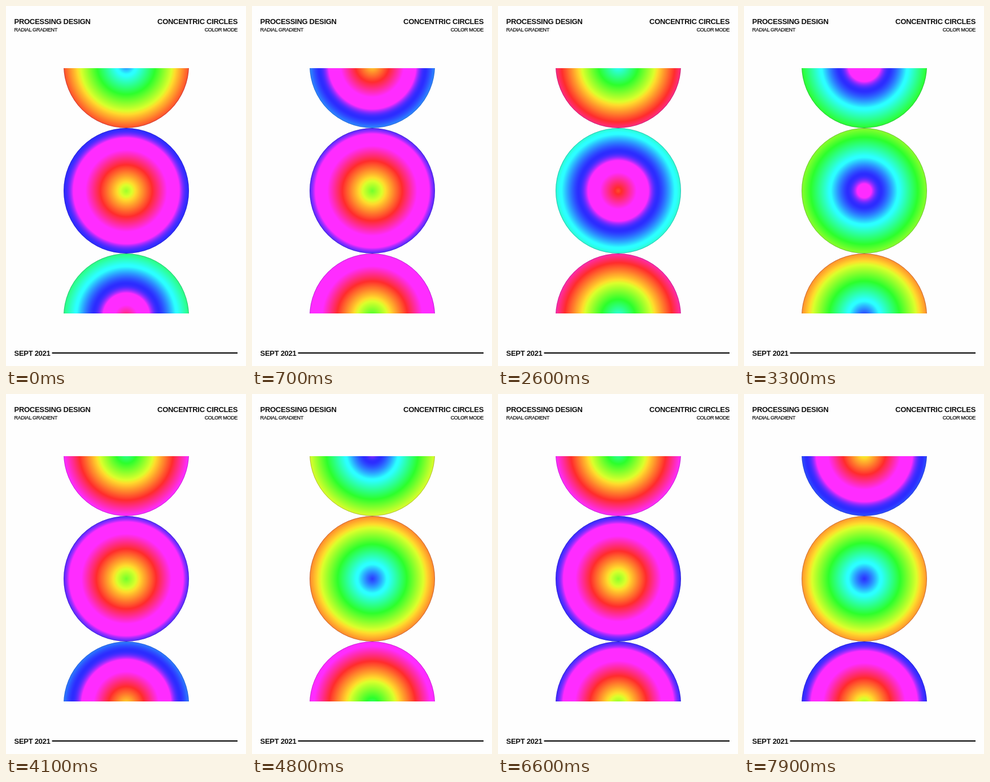
Recreate the animation shown at these times as an HTML page with a canvas. Size 425 px wide and 637 px high, loop 8 s.

```html
<!DOCTYPE html>
<html lang="en">
<head>
<meta charset="utf-8">
<title>Concentric Circles</title>
<style>
  html, body { margin: 0; width: 100%; height: 100%; overflow: hidden; background: #fefefe; }
  canvas, svg { position: absolute; left: 0; top: 0; width: 425px; height: 637px; display: block; }
  text { font-family: "Liberation Sans", Arial, sans-serif; fill: #111; }
  .bold { font-size: 13px; font-weight: 700; letter-spacing: -.3px; }
  .small { font-size: 9px; letter-spacing: -.32px; stroke: #111; stroke-width: .25px; }
  .end { text-anchor: end; }
</style>
</head>
<body>
<canvas></canvas>
<svg viewBox="0 0 425 637">
  <text class="bold" x="14.6" y="31.8">PROCESSING DESIGN</text>
  <text class="small" x="14.6" y="44.5">RADIAL GRADIENT</text>
  <text class="bold end" x="410" y="31.8">CONCENTRIC CIRCLES</text>
  <text class="small end" x="410" y="44.5">COLOR MODE</text>
  <text class="bold" x="14.6" y="618.5">SEPT 2021</text>
  <rect x="81.5" y="612.8" width="328.5" height="2.3" fill="#111"/>
</svg>
<script>
const W = 425, H = 637, LOOP = 8000;
const CX = 213, CY = 327, R = 111;
const TOP = 110, BOTTOM = 544;
const SPAN = 205;                   // degrees of hue from rim to centre
const FIRST = 700, HOLD = 1000;     // first hue jump, then one per second

// Rim hues of each circle, top to bottom, one per hold
const rims = [
  [10, 210, 340, 120, 308, 65, 310, 200, 225],
  [240, 253, 166, 90, 253, 28, 246, 298, 32],
  [143, 270, 330, 30, 213, 296, 248, 60, 241]
];

// 0 at hue a, 1 at hue b, clamped outside
const ramp = (h, a, b) => Math.min(1, Math.max(0, (h - a) / (b - a)));

// Hue wheel with a lifted floor and a broad magenta band
function hueColor(deg) {
  const h = deg % 360;
  const red = Math.max(ramp(h, 120, 55), ramp(h, 240, 272) ** 2);
  const green = Math.min(ramp(h, 0, 66), ramp(h, 240, 186) ** 1.3);
  const blue = Math.min(ramp(h, 120, 180), ramp(h, 360, 311));
  return `rgb(${[red, green, blue].map(c => Math.round(44 + 211 * c))})`;
}

const canvas = document.querySelector("canvas");
const ctx = canvas.getContext("2d");
const dpr = window.devicePixelRatio || 1;
canvas.width = W * dpr;
canvas.height = H * dpr;
ctx.scale(dpr, dpr);
ctx.rect(0, TOP, W, BOTTOM - TOP);
ctx.clip();
ctx.strokeStyle = "rgba(30, 0, 90, .25)";

function drawCircle(y, rim) {
  const fill = ctx.createRadialGradient(CX, y, 0, CX, y, R);
  for (let r = 0; r <= R; r++) {
    fill.addColorStop(r / R, hueColor(rim + SPAN * (1 - r / R)));
  }
  ctx.fillStyle = fill;
  ctx.beginPath();
  ctx.arc(CX, y, R, 0, Math.PI * 2);
  ctx.fill();
  ctx.beginPath();
  ctx.arc(CX, y, R - .5, 0, Math.PI * 2);
  ctx.stroke();
}

let shown = -1;

function render() {
  const t = performance.now() % LOOP;
  const step = Math.floor((t - FIRST) / HOLD) + 1;
  if (step !== shown) {
    shown = step;
    ctx.clearRect(0, 0, W, H);
    rims.forEach((hues, i) => drawCircle(CY + (i - 1) * 2 * R, hues[step]));
  }
  requestAnimationFrame(render);
}
render();
</script>
</body>
</html>
```
